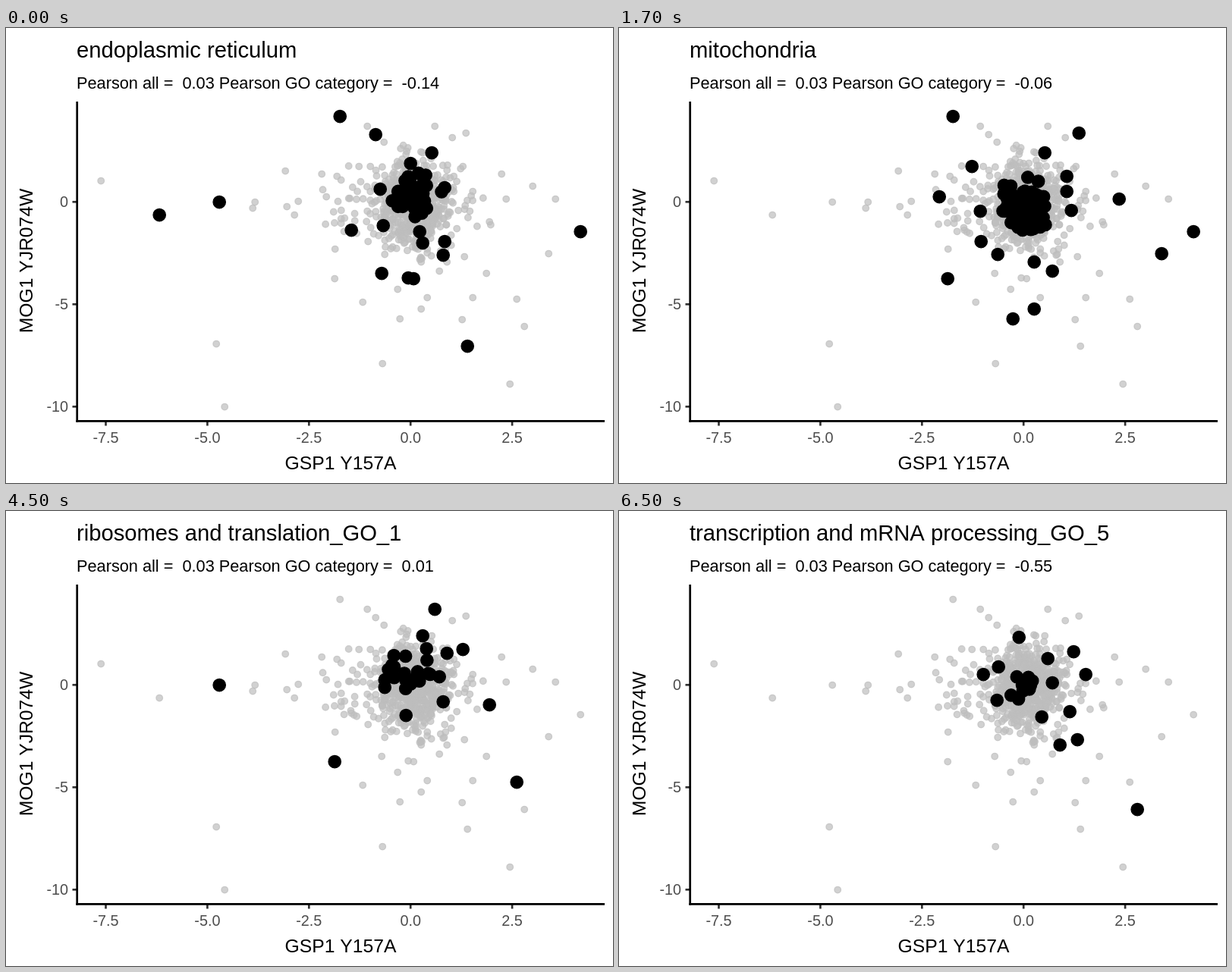
An HTML page with a canvas that plays this animation: 800 by 600 pixels, repeating every 8000 ms.

```html
<!DOCTYPE html>
<html lang="en">
<head>
<meta charset="utf-8">
<title>Correlation by GO category</title>
<style>
  html, body { margin: 0; width: 100%; height: 100%; overflow: hidden; background: #fff; }
  canvas { display: block; }
</style>
</head>
<body>
<canvas id="plot" width="800" height="600"></canvas>
<script>
const ctx = document.getElementById('plot').getContext('2d');

let seed = 7;
function random() {
  seed = (seed * 16807) % 2147483647;
  return seed / 2147483647;
}

function gauss() {
  return Math.sqrt(-2 * Math.log(random())) * Math.cos(2 * Math.PI * random());
}

// Normal scatter around (cx, cy), cut off at `limit` deviations.
function cloud(count, cx, cy, sx, sy, limit) {
  const points = [];
  while (points.length < count) {
    const u = gauss(), v = gauss();
    if (Math.hypot(u, v) < limit) points.push([cx + u * sx, cy + v * sy]);
  }
  return points;
}

// Each category is a dense cluster plus the key points that stand apart.
const categories = [
  { title: 'endoplasmic reticulum', r: '-0.14',
    cluster: cloud(42, 538, 225, 20, 21, 1.9),
    keys: [[440, 116], [487, 140], [561, 164], [533, 178], [493, 212], [281, 229],
      [202, 246], [455, 266], [495, 323], [530, 329], [537, 330], [608, 419], [757, 268],
      [576, 299], [578, 281], [549, 283], [578, 210], [497, 260], [545, 268]] },
  { title: 'mitochondria', r: '-0.06',
    cluster: cloud(72, 534, 234, 22, 23, 1.8),
    keys: [[440, 116], [606, 138], [561, 164], [465, 182], [422, 222], [476, 241],
      [433, 330], [519, 383], [547, 370], [571, 320], [715, 297], [757, 268], [659, 225],
      [590, 195], [590, 215], [596, 240], [499, 298], [477, 281], [547, 308]] },
  { title: 'chromatin organization_GO_2', r: '-0.03',
    cluster: cloud(10, 548, 217, 10, 10, 1.8),
    keys: [[588, 144], [416, 192], [436, 195], [422, 222], [480, 182], [494, 207],
      [494, 249], [533, 178], [588, 213], [557, 255], [546, 272], [555, 296], [594, 264],
      [715, 297], [601, 384], [664, 469], [288, 499]] },
  { title: 'ribosomes and translation_GO_1', r: '0.01',
    cluster: cloud(16, 530, 213, 20, 14, 1.8),
    keys: [[565, 129], [549, 164], [554, 181], [602, 182], [581, 187], [511, 190],
      [571, 218], [499, 232], [527, 269], [576, 251], [637, 255], [281, 229],
      [433, 330], [673, 357]] },
  { title: 'transcription and mRNA processing_GO_5', r: '-0.55',
    cluster: cloud(11, 535, 230, 12, 14, 1.8),
    keys: [[527, 166], [599, 185], [565, 194], [500, 205], [480, 215], [571, 226],
      [615, 215], [498, 249], [557, 271], [594, 264], [604, 301], [581, 308], [683, 393]] }
];

const outliers = [[125, 201], [277, 416], [328, 229], [325, 237], [368, 188], [370, 235],
  [380, 246], [385, 228], [496, 442], [470, 361], [516, 344], [555, 355], [615, 355],
  [633, 323], [653, 192], [694, 208], [724, 225], [476, 129], [498, 150]];

// Key points shared by several categories are drawn once.
const keys = new Map(categories.flatMap(c => c.keys).map(p => [p.join(), p]));
const background = [
  ...outliers,
  ...keys.values(),
  ...categories.flatMap(c => c.cluster),
  ...cloud(330, 538, 229, 23, 25, 2.4),
  ...cloud(170, 537, 238, 34, 42, 2.1),
  ...cloud(28, 446, 235, 18, 32, 1.9),
  ...cloud(8, 623, 235, 12, 22, 1.8)
];

function dots(points, radius, color) {
  ctx.fillStyle = ctx.strokeStyle = color;
  ctx.lineWidth = 1.3;
  for (const [x, y] of points) {
    ctx.beginPath();
    ctx.arc(x + .2, y + .6, radius, 0, 2 * Math.PI);
    ctx.fill();
    ctx.stroke();
  }
}

function label(str, x, y, size, align = 'left', color = '#000') {
  ctx.font = size + 'px "Liberation Sans", Arial, sans-serif';
  ctx.fontKerning = 'none';
  ctx.textAlign = align;
  ctx.fillStyle = color;
  ctx.fillText(str, x, y);
}

function line(x1, y1, x2, y2, color) {
  ctx.strokeStyle = color;
  ctx.lineWidth = 2.7;
  ctx.beginPath();
  ctx.moveTo(x1, y1);
  ctx.lineTo(x2, y2);
  ctx.stroke();
}

function axes() {
  for (const v of [-7.5, -5, -2.5, 0, 2.5]) {
    const x = 533.2 + v * 53.56;
    line(x, 518, x, 524.5, '#333');
    label(v.toFixed(1), x, 547, 19.8, 'center', '#4d4d4d');
  }
  for (const v of [0, -5, -10]) {
    const y = 229.3 - v * 27;
    line(87.5, y, 94, y, '#333');
    label(v, 82, y + 7, 19.8, 'right', '#4d4d4d');
  }
  line(93.7, 97, 93.7, 519.7, '#000');
  line(92.4, 518.4, 789, 518.4, '#000');
  label('GSP1 Y157A', 441, 582, 24.7, 'center');
  ctx.save();
  ctx.translate(35, 307);
  ctx.rotate(-Math.PI / 2);
  label('MOG1 YJR074W', 0, 0, 24.7, 'center');
  ctx.restore();
}

function draw({ title, r, cluster, keys }) {
  ctx.fillStyle = '#fff';
  ctx.fillRect(0, 0, 800, 600);
  dots(background, 4.3, 'rgba(190,190,190,.7)');
  dots([...cluster, ...keys], 8.2, '#000');
  axes();
  label(title, 93, 39, 29.2);
  label('Pearson all = \u00a00.03 Pearson GO category = \u00a0' + r, 93, 80, 21.73);
}

let shown = -1;
function tick() {
  const t = performance.now() % 8000;
  const index = Math.floor((t + 1500) / 2000);
  if (index !== shown) draw(categories[shown = index]);
  requestAnimationFrame(tick);
}
tick();
</script>
</body>
</html>
```
